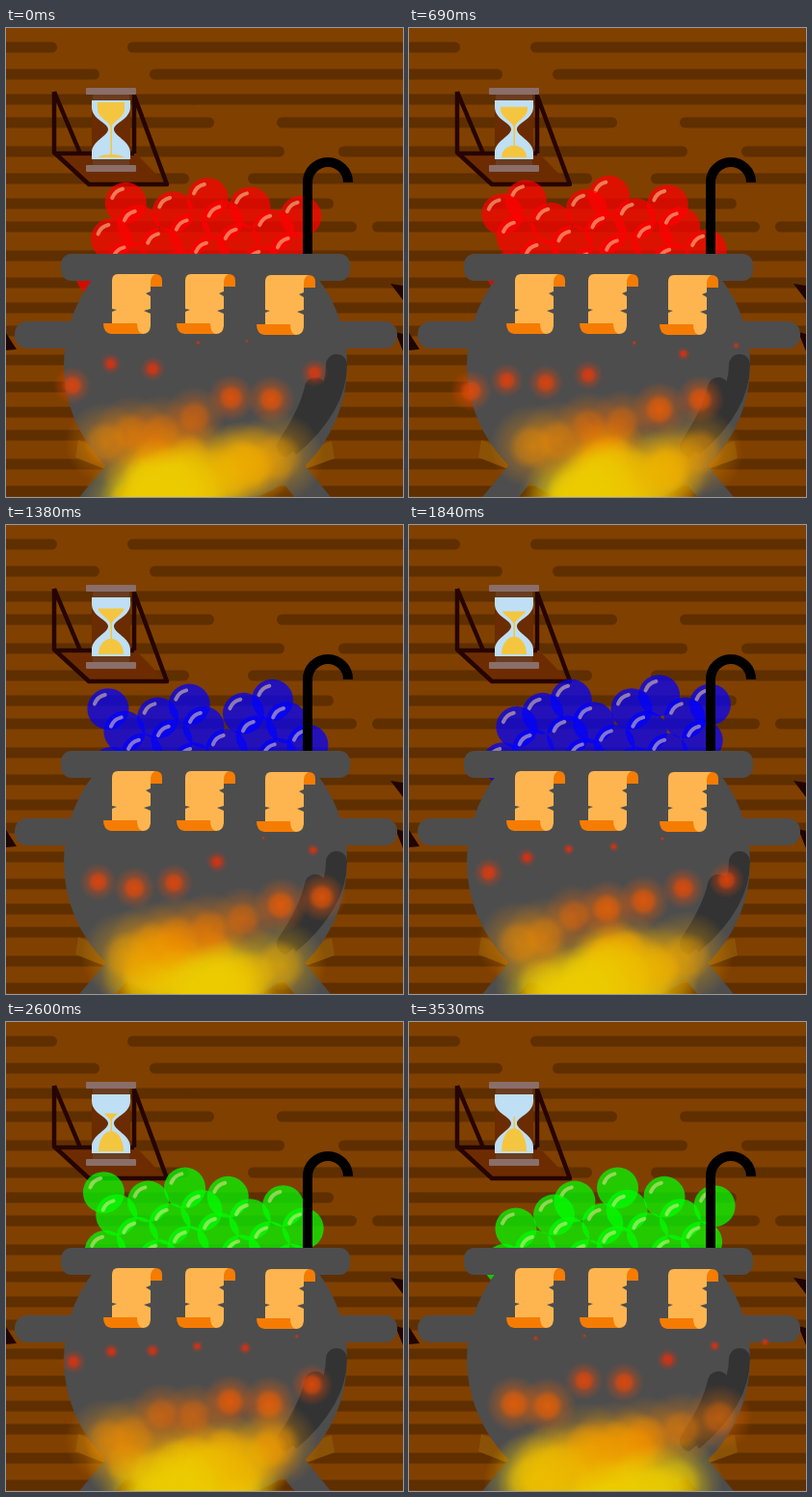
Animation of 412 by 486 pixels, one loop 3.6 s. Source, as an HTML page with a canvas:

```html
<!DOCTYPE html>
<html lang="en">
<head>
<meta charset="utf-8">
<title>Cauldron</title>
<style>
html, body { margin: 0; width: 100%; height: 100%; overflow: hidden; background: #804000; }
canvas { display: block; }
</style>
</head>
<body>
<canvas id="stage" width="412" height="486"></canvas>
<script>
const ctx = document.getElementById('stage').getContext('2d');
const LOOP = 3600, STEP = 76.6, LAST = 46;
const IRON = '#4d4d4d', DARK = '#333';

// Deterministic noise in 0..1.
const rnd = n => { const s = Math.sin(n * 127.1 + 11.7) * 43758.5453; return s - Math.floor(s); };
// Evenly scattered sequence in 0..1.
const scatter = n => (n * 0.618034 + 100) % 1;

function fill(path, color) { ctx.fillStyle = color; ctx.fill(new Path2D(path)); }
function line(path, color, width, cap = 'butt') {
  ctx.strokeStyle = color; ctx.lineWidth = width; ctx.lineCap = cap;
  ctx.stroke(new Path2D(path));
}
function bar(x, y, w, h, r, color) {
  ctx.fillStyle = color;
  ctx.beginPath(); ctx.roundRect(x, y, w, h, r); ctx.fill();
}
function disc(x, y, r) { ctx.beginPath(); ctx.arc(x, y, r, 0, 7); ctx.fill(); }

// The plank rows repeat every 108 px; some rows have a gap.
const rows = [20, 48, 74, 98];
const gaps = [[53, 126], [97, 149], null, [216, 281], [289, 345], [190, 251], [340, 420], [364, 380]];

function drawWall() {
  ctx.fillStyle = '#804000';
  ctx.fillRect(0, 0, 412, 486);
  for (let i = 0; i < 18; i++) {
    const y = rows[i % 4] + 108 * Math.floor(i / 4) - 5.5;
    const [from, to] = gaps[i] || [200, 190];
    bar(-9, y, from + 9, 11, 5.5, '#5f2f00');
    bar(to, y, 430 - to, 11, 5.5, '#5f2f00');
  }
  fill('M0 316L11 333L0 334ZM399 265L412 267V282ZM404 315L412 317V335Z', '#200500');
}

function drawShelf() {
  fill('M50 130H135L166 162H86Z', '#6d2c00');
  ctx.lineJoin = 'round';
  line('M50 66V129L86 162H167L133 70V130M50 66L77 130M51 130H133', '#260400', 4.5);
}

const glass = new Path2D('M89 75H129V82C129 95 112 98 112 105C112 112 129 117 129 129V136H89V129C89 117 106 112 106 105C106 98 89 95 89 82Z');
const upperSand = new Path2D('M95 77H123V85C122 93 112 96 109 103C106 96 96 93 95 85Z');

function drawHourglass(p) {
  ctx.fillStyle = '#6a3d20';
  ctx.fillRect(90, 66, 38, 79);
  fill('M89 75H129V136H89Z', '#6a2c00');
  ctx.fillStyle = '#bfdff4';
  ctx.fill(glass);
  ctx.save();
  ctx.clip(glass);
  ctx.fillStyle = '#f4c640';
  ctx.fillRect(108.5, 98, 1.5, 36);
  ctx.beginPath();
  ctx.ellipse(109, 134, 13, 3 + 21 * Math.sqrt(p), 0, Math.PI, 0);
  ctx.fill();
  ctx.beginPath();
  ctx.rect(85, 77 + 24 * p, 48, 40);
  ctx.clip();
  ctx.fill(upperSand);
  ctx.restore();
  bar(83, 62, 52, 7, 1, '#8a6e69');
  bar(83, 142, 52, 7, 1, '#8a6e69');
}

// Three bubbles leave the pot every two steps and pop above the rim.
function drawBubbles(k) {
  const rgb = k < 16 ? '255,0,0' : k < 32 ? '0,0,255' : '0,255,0';
  for (let i = -20; i <= k * 1.5; i++) {
    const age = k - i / 1.5;
    const x = 94 + 224 * scatter(i) + (rnd(i) - .5) * age * 1.5;
    const y = 256 - 7 * age;
    if (y < 168 + 14 * rnd(i + 300)) continue;
    ctx.fillStyle = `rgba(${rgb},.72)`;
    disc(x, y, 21.5);
    ctx.strokeStyle = 'rgba(255,230,170,.5)';
    ctx.lineWidth = 4; ctx.lineCap = 'round';
    ctx.beginPath(); ctx.arc(x, y, 15, 3.5, 4.5); ctx.stroke();
  }
}

function drawScroll(x, y) {
  ctx.save();
  ctx.translate(x, y);
  fill('M54 0Q61 0 61 7V13H48V7Q49 0 54 0Z', '#f57c00');
  fill('M0 51H35L42 62H8Q0 61 0 51Z', '#f57c00');
  fill('M15 0H54Q49 2 49 9V18L44 20L49 23V36L42 38L49 41V54Q48 62 41 62Q35 61 35 51H9V39L14 37L9 36V7Q9 0 15 0Z', '#ffb54f');
  ctx.restore();
}

function drawPot() {
  line('M313 236V160A21 21 0 0 1 355 160', '#000', 10);
  fill('M75 427L112 440L105 458L72 445ZM338 428L302 440L308 458L341 446Z', '#8a5206');
  bar(9, 304, 397, 28, 13, IRON);
  ctx.save();
  ctx.beginPath(); ctx.rect(0, 240, 412, 246); ctx.clip();
  ctx.fillStyle = IRON;
  disc(207, 349, 147);
  ctx.clip();
  line('M343 349Q343 392 294 434', DARK, 22, 'round');
  line('M321 373Q315 400 292 434', DARK, 22, 'round');
  ctx.restore();
  line('M125 450L85 498', IRON, 29);
  line('M287 448L328 498', IRON, 29);
  bar(57, 234, 300, 28, 11, IRON);
  drawScroll(101, 255);
  drawScroll(177, 255);
  drawScroll(260, 256);
}

const heat = [[222, 48, 14], [236, 112, 0], [236, 204, 0]];
function flame(x, y, r, a) {
  const u = Math.min(1.999, Math.max(0, (y - 350) / 64)), i = Math.floor(u);
  const c = heat[i].map((v, j) => Math.round(v + (heat[i + 1][j] - v) * (u - i))).join();
  const g = ctx.createRadialGradient(x, y, 0, x, y, r);
  g.addColorStop(0, `rgba(${c},${a})`);
  g.addColorStop(.35, `rgba(${c},${a * .8})`);
  g.addColorStop(.55, `rgba(${c},${a * .38})`);
  g.addColorStop(1, `rgba(${c},0)`);
  ctx.fillStyle = g;
  disc(x, y, r);
}

function drawFire(k) {
  // Broad glow at the foot.
  for (let i = -14; i <= k * 2; i++) {
    const age = k - i / 2;
    if (age > 7) continue;
    const x = 198 + (rnd(i + 40) + rnd(i + 540) - 1) * 95;
    flame(x, 502 - age * 9, 58 - age * 3, .8);
  }
  // Embers fan out, cool and shrink as they climb.
  for (let i = -20; i <= k * 1.4; i++) {
    const age = k - i / 1.4;
    const side = 2 * scatter(i * 3) - 1;
    const x = 206 + side * (65 + 8.5 * age);
    const y = 500 - age * (12.5 + 3 * rnd(i + 70));
    if (y > 324) flame(x, y, Math.min(48, 2 + (y - 324) * .38), y < 400 ? .92 : .72);
  }
}

let start;
function show(now) {
  start ??= now;
  const k = Math.min(LAST, Math.floor(((now - start) % LOOP + 8) / STEP));
  drawWall();
  drawShelf();
  drawHourglass(k / LAST);
  drawBubbles(k);
  drawPot();
  drawFire(k);
  requestAnimationFrame(show);
}
requestAnimationFrame(show);
</script>
</body>
</html>
```
